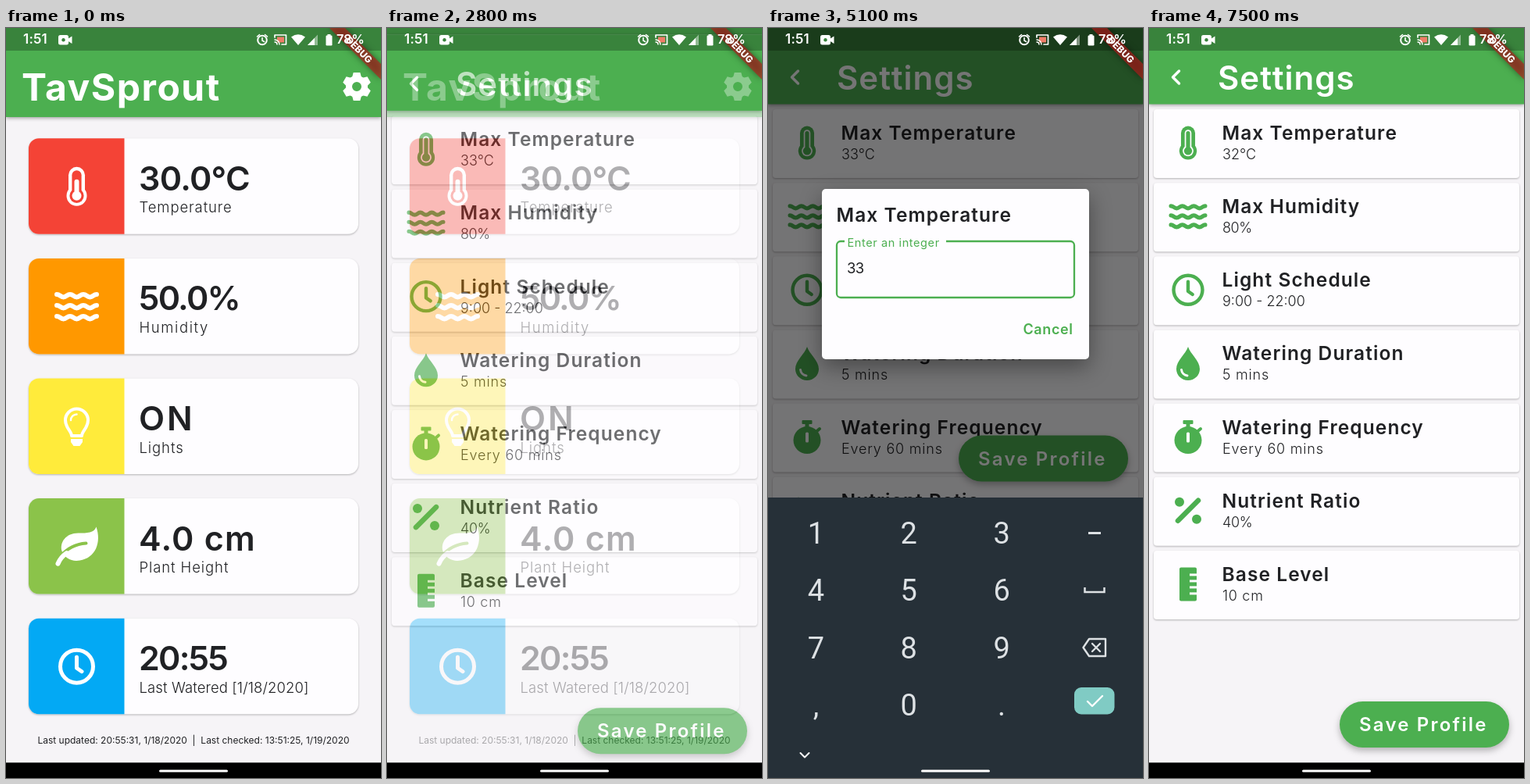
Animation of 480 by 960 pixels, one loop 8000 ms. Source, as an HTML page:

```html
<!DOCTYPE html>
<html lang="en">
<head>
<meta charset="utf-8">
<title>Garden monitor</title>
<style>
html, body { margin: 0; width: 100%; height: 100%; overflow: hidden; background: #000; }
svg { display: block; width: 100vw; height: 100vh; font-family: Inter, "Open Sans", sans-serif; }
.card { filter: drop-shadow(0 1px 1.3px rgba(0,0,0,.27)); }
.bar { filter: drop-shadow(0 1px 2.5px rgba(0,0,0,.4)); }
.fab { filter: drop-shadow(0 4px 4px rgba(0,0,0,.28)); }
.dialog { filter: drop-shadow(0 10px 14px rgba(0,0,0,.38)); }
.banner { filter: drop-shadow(0 0 4px rgba(0,0,0,.7)); }
.line { fill: none; stroke-linecap: round; stroke-linejoin: round; }
.keys { font-family: Roboto, sans-serif; }
</style>
</head>
<body>
<svg id="stage" viewBox="0 0 480 960" xmlns="http://www.w3.org/2000/svg"></svg>
<script>
const GREEN = '#4caf50', PAGE = '#f6f4f7', CARD = '#fefdff', INK = '#202124', KEY = '#dde1e4';
const LOOP = 8000;

const text = (x, y, s, size, weight, fill, gap = 0, extra = '') =>
  `<text x="${x}" y="${y}" font-size="${size}" font-weight="${weight}" fill="${fill}" letter-spacing="${gap}" ${extra}>${s}</text>`;
const rect = (x, y, w, h, fill, r = 0, extra = '') =>
  `<rect x="${x}" y="${y}" width="${w}" height="${h}" rx="${r}" fill="${fill}" ${extra}/>`;
const circle = (x, y, r, fill) => `<circle cx="${x}" cy="${y}" r="${r}" fill="${fill}"/>`;
const line = (d, color, width) => `<path class="line" d="${d}" stroke="${color}" stroke-width="${width}"/>`;
const shape = (d, fill, extra = '') => `<path d="${d}" fill="${fill}" ${extra}/>`;
const at = (x, y, s, body) => `<g transform="translate(${x} ${y}) scale(${s})">${body}</g>`;

const thermometer = (top, gap) => (c, b) =>
  line('M0-14.5V11', c, 21) + circle(0, 12, 13, c) +
  line('M0-14.5V11', b, 6 + 2 * gap) + circle(0, 12, 6 + gap, b) +
  line(`M0 ${top}V11`, c, 6) + circle(0, 12, 6, c);

// Icons are centred on the origin; c is the ink, b the colour behind it.
const icons = {
  halfThermometer: thermometer(-6, 3.1),
  fullThermometer: thermometer(-14.5, 2),
  waves: c => [-14, 0, 14].map(y =>
    line(`M-25.5 ${y - 1.5}` + 'c4 0 4.5 3.5 8.5 3.5s4.5-3.5 8.500-3.5'.repeat(3), c, 6)).join(''),
  bulb: c =>
    line('M-6.5 12C-6.5 6-14.5 2-14.5-8A14.5 14.5 0 0 1 14.5-8C14.5 2 6.5 6 6.5 12Z', c, 4) +
    line('M-7.5-8a7.5 7.5 0 0 1 7.5-7.5', c, 2.5) +
    shape('M-7.5 16H7.5V20L4 25H-4L-7.5 20Z', c),
  leaf: (c, b) =>
    shape('M25-25C22-17 14-17 2-17C-14-17-22-5-19 6C-16 15-6 20 4 18C24 15 32-5 25-25Z', c) +
    line('M-21 13C-12 2-2-3 12-4', b, 4) +
    line('M-24 22C-22 17-18 12-13 8.5', c, 6),
  clock: c => `<circle r="21" fill="none" stroke="${c}" stroke-width="5"/>` + line('M0-12V2L6.5 6.5', c, 5),
  drop: (c, b) =>
    shape('M0-21.5C3-12 15-4 15 7A15 14.5 0 0 1-15 7C-15-4-3-12 0-21.5Z', c) +
    line('M-8.5 8a8.5 8.5 0 0 0 7.5 7.5', b, 3),
  stopwatch: (c, b) =>
    circle(0, 4, 17.5, c) + rect(-6.5, -21.5, 13, 5, c, 1) + rect(-2.5, -18, 5, 8, c) +
    line('M12-7L16-10.5', c, 4) + rect(-2, -6, 4, 13, b, 1.5),
  percent: c => line('M-13 13L13-13', c, 6.5) + circle(-11, -11, 6, c) + circle(11, 11, 6, c),
  ruler: (c, b) => rect(-11, -21.5, 22, 43, c, 2) +
    [-13.5, -5.5, 2.5, 10.5].map(y => rect(2, y, 9, 3, b)).join(''),
  gear: c => `<circle r="10" fill="none" stroke="${c}" stroke-width="8"/>` +
    [0, 60, 120, 180, 240, 300].map(a =>
      shape('M-6.5-10L-4.3-18H4.3L6.5-10Z', c, `transform="rotate(${a})"`)).join('')
};

function homePage() {
  const cards = [
    ['#f44336', 'halfThermometer', '30.0°C', -.7, 'Temperature', .9],
    ['#ff9800', 'waves', '50.0%', -1.7, 'Humidity', 1.6],
    ['#ffeb3b', 'bulb', 'ON', 3, 'Lights', .9],
    ['#8bc34a', 'leaf', '4.0 cm', 1.2, 'Plant Height', .9],
    ['#03a9f4', 'clock', '20:55', -1.7, 'Last Watered [1/18/2020]', .1]
  ];
  const body = cards.map(([color, icon, value, gap, label, labelGap], i) => {
    const y = 141.3 + 153.6 * i;
    return rect(29, y, 422, 122.5, CARD, 13, 'class="card"') +
      shape(`M151.5 ${y}H42a13 13 0 0 0-13 13v96.5a13 13 0 0 0 13 13H151.5Z`, color) +
      at(90.5, y + 61.5, 1, icons[icon]('#fff', color)) +
      text(170, y + 66.5, value, 43, 600, INK, gap) +
      text(170.5, y + 95, label, 18.5, 300, INK, labelGap);
  }).join('');
  return rect(0, 0, 480, 941, PAGE) + rect(0, 0, 480, 114, GREEN, 0, 'class="bar"') +
    text(20, 93, 'TavSprout', 48, 700, '#fff', 1.5) + at(449, 75, 1, icons.gear('#fff')) + body +
    text(240, 916, 'Last updated: 20:55:31, 1/18/2020&#160; | &#160;Last checked: 13:51:25, 1/19/2020',
      12, 400, INK, 0, 'text-anchor="middle"');
}

function settingsPage() {
  const rows = [
    ['fullThermometer', .86, 'Max Temperature', '33°C', 0],
    ['waves', .86, 'Max Humidity', '80%', -.4],
    ['clock', .88, 'Light Schedule', '9:00 - 22:00', 0],
    ['drop', 1, 'Watering Duration', '5 mins', .8],
    ['stopwatch', 1, 'Watering Frequency', 'Every 60 mins', .8],
    ['percent', 1, 'Nutrient Ratio', '40%', -.4],
    ['ruler', 1, 'Base Level', '10 cm', .7]
  ];
  const body = rows.map(([icon, size, title, value, gap], i) => {
    const y = 104 + 94.15 * i;
    return rect(6, y, 468, 88, CARD, 4, 'class="card"') +
      at(50, y + 43, size, icons[icon](GREEN, CARD)) +
      text(93.5, y + 39, title, 24.5, 600, INK, 1.08) +
      text(94, y + 64, value, 18, 300, INK, gap, i ? '' : 'id="maxTemp"');
  }).join('');
  return rect(0, 0, 480, 941, PAGE) + rect(0, 0, 480, 97.5, GREEN, 0, 'class="bar"') +
    line('M38.5 55L30.5 63L38.5 71', '#fff', 3.5) +
    text(88, 79, 'Settings', 42, 600, '#fff', 1) + body +
    `<g id="save">${rect(244, 862, 217, 59, GREEN, 29.5, 'class="fab"')}` +
    text(269, 900, 'Save Profile', 24, 600, '#fff', 2.2) + '</g>';
}

const dialogBox = () =>
  rect(69, 376, 342, 218, CARD, 5, 'class="dialog"') +
  text(87.5, 418, 'Max Temperature', 24.5, 600, INK, 1.08) +
  '<path id="field" fill="none" d="M98 443H93a5 5 0 0 0-5 5V510a5 5 0 0 0 5 5H387a5 5 0 0 0 5-5V448a5 5 0 0 0-5-5H228"/>' +
  text(101.5, 450, 'Enter an integer', 14.5, 400, '#777', .6, 'id="label"') +
  text(101, 484, '33', 18.5, 400, INK, -.6, 'id="entry"') +
  rect(124, 466, 2.3, 24, '#3d8fd1', 0, 'id="cursor"') +
  text(326.5, 562, 'Cancel', 18, 600, GREEN, .6);

function keyboard() {
  const keys = ['123', '456', '789', ',0.'].map((row, r) => [...row].map((k, c) =>
    text(61.5 + 118.8 * c, 660 + 73.3 * r, k, 38, 400, KEY, 0, 'text-anchor="middle"')).join('')).join('');
  return rect(0, 601, 480, 360, '#263038') + `<g class="keys">${keys}</g>` +
    rect(410, 645, 16, 3, KEY) +
    `<path d="M405.5 716V722H430.5V716" fill="none" stroke="${KEY}" stroke-width="2.5"/>` +
    line('M411 782H432V804H411L403.5 793Z', KEY, 2.4) +
    line('M415 788L425 798M425 788L415 798', KEY, 2.4) +
    rect(392, 844, 51.5, 34.5, '#80cbc4', 9) + line('M409 862L415 868L428 855', '#fff', 2.4);
}

const statusBar = () =>
  shape('M414 0H434L480 46V66Z', 'rgba(183,28,28,.63)', 'class="banner"') +
  text(0, 4.3, 'DEBUG', 12, 800, '#fff', 0, 'text-anchor="middle" transform="translate(452 28) rotate(45)"') +
  text(22, 20, '1:51', 17, 600, '#fff', .2) +
  rect(67, 9, 13, 12.5, '#fff', 2.5) + shape('M79 14L84.5 10.5V20L79 16.5Z', '#fff') +
  circle(73.5, 15.2, 2.2, '#39833c') +
  '<circle cx="328" cy="15.5" r="5.8" fill="none" stroke="#fff" stroke-width="2"/>' +
  line('M328 12.5V16L330.5 17.5M321.5 11L324.5 8.5M334.5 11L331.5 8.5', '#fff', 1.6) +
  line('M344 12V9H358.5V21H353', '#fff', 1.7) + rect(347, 11.5, 9, 7, '#ef7d68') +
  line('M344 15a6 6 0 0 1 6 6M344 18a3 3 0 0 1 3 3', '#fff', 1.5) +
  shape('M365 11.5Q374 5 383 11.5L374 22Z', '#fff') +
  shape('M386 22L399 8.5V22Z', 'rgba(255,255,255,.45)') + shape('M386 22L395 12.7V22Z', '#fff') +
  rect(409.5, 9.5, 8, 13, '#fff', 1.2) + rect(411.5, 8, 4, 2.5, '#fff') +
  text(423, 20, '78%', 16.5, 600, '#fff', -.3);

document.getElementById('stage').innerHTML =
  `<g>${homePage()}</g><g id="settings">${settingsPage()}</g>` +
  rect(0, 0, 480, 29, 'rgba(0,0,0,.25)') +
  rect(0, 0, 480, 941, '#000', 0, 'id="shade"') +
  `<g id="dialog">${dialogBox()}</g>` +
  rect(0, 940.3, 480, 20, '#000') +
  `<g id="keyboard">${keyboard()}</g>` +
  `<g id="hide">${line('M41.5 928L47 933.5L52.5 928', '#fff', 2)}</g>` +
  rect(196, 949.6, 88, 3, '#fff', 1.5) + statusBar() +
  '<circle id="touch" r="13.5" fill="rgba(255,255,255,.45)" stroke="rgba(185,190,202,.5)" stroke-width="2.5"/>';

const ui = {};
for (const el of document.querySelectorAll('[id]')) ui[el.id] = el;

const clamp = v => Math.max(0, Math.min(1, v));
const ramp = (t, start, length) => clamp((t - start) / length);
const within = (t, a, b) => t >= a && t < b;

function bezier(x1, y1, x2, y2) {
  const curve = (a, b, u) => 3 * a * u * (1 - u) ** 2 + 3 * b * u * u * (1 - u) + u ** 3;
  return x => {
    let lo = 0, hi = 1;
    for (let i = 0; i < 24; i++) {
      const mid = (lo + hi) / 2;
      if (curve(x1, x2, mid) < x) lo = mid; else hi = mid;
    }
    return curve(y1, y2, (lo + hi) / 2);
  };
}
const fastOutSlowIn = bezier(.4, 0, .2, 1);
const easeIn = bezier(.42, 0, 1, 1);
const easeOut = bezier(0, 0, .58, 1);

// Each tap: start, end, x, y.
const taps = [
  [2500, 2600, 449, 75], [3600, 3800, 112, 162.5], [4500, 4700, 157, 483],
  [5500, 5800, 419, 793], [6100, 6500, 173, 661], [7200, 7400, 418, 861]
];
const blinks = [[5100, 5600], [6200, 6300], [6800, 7300]];

const set = (el, attrs) => { for (const k in attrs) el.setAttribute(k, attrs[k]); };
const show = (el, on) => set(el, { visibility: on ? 'visible' : 'hidden' });
const shift = (el, y) => set(el, { transform: `translate(0 ${y})` });

function draw(now) {
  const t = Math.floor(now % LOOP / 100) * 100;

  const page = ramp(t, 2570, 300);
  set(ui.settings, { opacity: easeIn(page) });
  shift(ui.settings, page < 1 ? 240 * (1 - fastOutSlowIn(page)) : 0);
  show(ui.settings, page > 0);
  ui.maxTemp.textContent = t < 7300 ? '33°C' : '32°C';

  const open = ramp(t, 3770, 150) * (1 - ramp(t, 7270, 150));
  set(ui.shade, { opacity: .54 * open });
  set(ui.dialog, { opacity: open });
  shift(ui.dialog, -170 * ramp(t, 4700, 150) * (1 - ramp(t, 7250, 100)));

  const keys = easeOut(ramp(t, 4620, 280)) * (1 - ramp(t, 7250, 200));
  shift(ui.keyboard, 360 * (1 - keys));
  show(ui.keyboard, within(t, 4700, 7500));
  show(ui.hide, within(t, 4600, 7400));
  shift(ui.save, within(t, 4800, 7300) ? -340.5 : 0);

  const focused = t >= 4700;
  set(ui.field, { stroke: focused ? GREEN : '#8b8b8d', 'stroke-width': focused ? 2.3 : 1.3 });
  set(ui.label, { fill: focused ? GREEN : '#777' });
  const entry = t < 5700 ? '33' : t < 6300 ? '3' : '32';
  ui.entry.textContent = entry;
  set(ui.cursor, { x: entry.length > 1 ? 124 : 112.5 });
  show(ui.cursor, within(t, 4600, 7500) && !blinks.some(([a, b]) => within(t, a, b)));

  const tap = taps.find(([a, b]) => within(t, a, b));
  show(ui.touch, tap);
  if (tap) set(ui.touch, { cx: tap[2], cy: tap[3] });
}

const start = performance.now();
function tick() {
  draw(performance.now() - start);
  requestAnimationFrame(tick);
}
tick();
</script>
</body>
</html>
```
